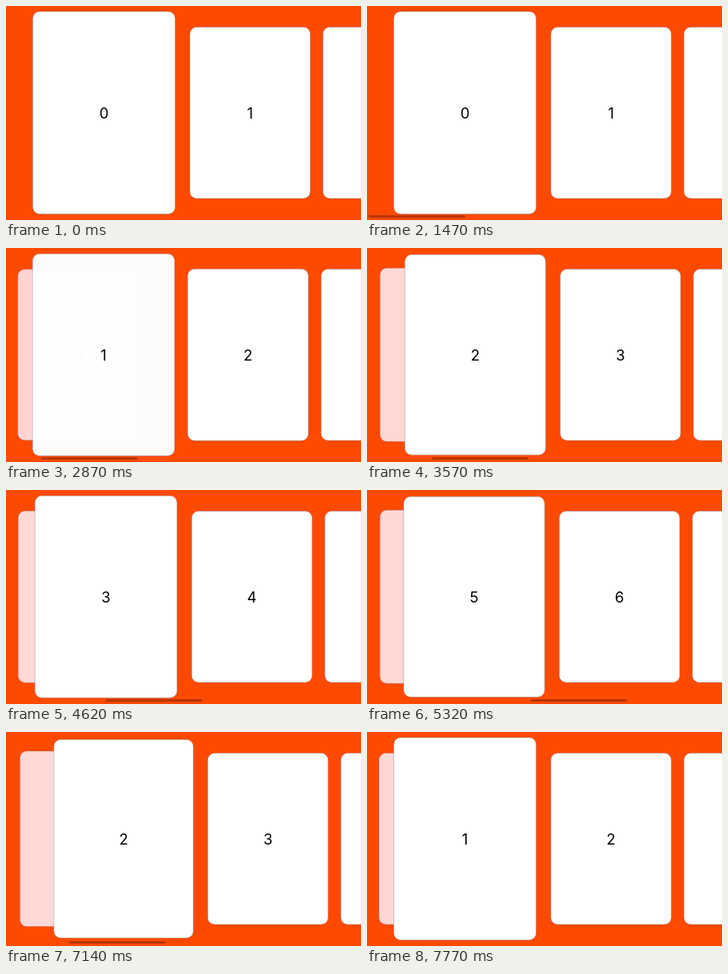
An HTML page for the animation above (8.54 s loop, 444 by 268 pixels).

```html
<!DOCTYPE html>
<html lang="en">
<head>
<meta charset="utf-8">
<title>Card carousel</title>
<style>
  html, body { margin: 0; width: 100%; height: 100%; overflow: hidden; background: #fd4a00; }
  svg { display: block; width: 444px; height: 268px; }
  text { font: 400 18.5px Inter, Roboto, sans-serif; text-anchor: middle; fill: #000; }
  .face { fill: #fff; stroke: #85809a; stroke-opacity: .55; stroke-width: .8; }
  .tint { fill: #fe4a3c; }
</style>
</head>
<body>
<svg id="stage" viewBox="0 0 444 268">
  <rect width="444" height="268" fill="#fd4a00"/>
  <g id="tints"></g>
  <g id="cards"></g>
  <rect id="bar" y="262" width="121" height="3" rx="1.5" fill="#000"/>
</svg>
<script>
const LOOP = 8540, STEP = 70, COUNT = 9, CY = 133.75;
const $ = id => document.getElementById(id);
const clamp = (v, a = 0, b = 1) => Math.min(b, Math.max(a, v));

function add(parent, tag, attrs) {
  const el = document.createElementNS('http://www.w3.org/2000/svg', tag);
  set(el, attrs);
  return parent.appendChild(el);
}
function set(el, attrs) {
  for (const k in attrs) el.setAttribute(k, attrs[k]);
}

const cards = Array.from({ length: COUNT }, (_, i) => {
  const group = add($('cards'), 'g', {});
  const face = add(group, 'rect', { class: 'face', rx: 8.5 });
  const label = add(group, 'text', { y: 140.5 });
  label.textContent = i;
  return { group, face, label, tint: add($('tints'), 'rect', { class: 'tint', rx: 8.5 }) };
});

// Each swipe: the finger drags to a page position, then the list settles on a whole page.
const swipes = [
  { start: 1540, release: 1990, from: 0, drag: 1.33, to: 1, tau: 70, soft: true },
  { start: 2800, release: 3374, from: 1, drag: 1.5, to: 2, tau: 100 },
  { start: 3680, release: 4273, from: 2, drag: 2.55, to: 3, tau: 100 },
  { start: 4640, release: 5044, from: 3, drag: 4, to: 5, tau: 100 },
  { start: 6020, release: 6440, from: 5, drag: 3.384, to: 2, tau: 90 },
  { start: 7080, release: 7210, from: 2, drag: 1.5, to: 1, tau: 75 }
];

function position(t) {
  const s = swipes.filter(w => t >= w.start).pop();
  if (!s) return 0;
  if (t < s.release) {
    const u = (t - s.start) / (s.release - s.start);
    const e = s.soft ? u * u * (3 - 2 * u) : Math.pow(u, 1.7);
    return s.from + (s.drag - s.from) * e;
  }
  const u = (t - s.release) / s.tau;
  const left = Math.exp(-u) * (s.soft ? 1 + u : 1);
  return left < .002 ? s.to : s.to + (s.drag - s.to) * left;
}

function centre(r) {
  if (r < 0) return 122.5 + 32.25 * r;
  return r < 1 ? 122.5 + 182.75 * r : 305.25 + 166.5 * (r - 1);
}

function opacity(r) {
  if (r >= 0) return 1;
  if (r > -1) return 1 - .215 * clamp(-r / .15);
  return clamp(.785 + 1.12 * (r + 1));
}

function barOpacity(t) {
  const shown = (on, off) => t >= on ? clamp((off - t) / 140) : 0;
  return t < 6000 ? shown(1470, 5880) : shown(6020, 7770);
}

function draw(t) {
  const p = position(t);
  cards.forEach((c, i) => {
    const r = i - p, alpha = opacity(r), x = centre(r);
    const shrink = r > 0 ? Math.min(r, 1) : -r;
    const w = Math.max(0, 178 - 27.5 * shrink), h = Math.max(0, 253.5 - 39 * shrink);
    const box = { x: x - w / 2, y: CY - h / 2, width: w, height: h };
    set(c.face, box);
    set(c.tint, { ...box, opacity: r < 0 ? clamp(alpha * 3) : 0 });
    set(c.label, { x });
    set(c.group, { opacity: alpha, display: alpha > 0 && box.x < 450 ? 'inline' : 'none' });
  });
  set($('bar'), { x: 2 + 41 * p, opacity: .28 * barOpacity(t) });
}

const began = performance.now();
function frame() {
  const t = (performance.now() - began) % LOOP;
  draw(Math.floor(t / STEP) * STEP);
  requestAnimationFrame(frame);
}
frame();
</script>
</body>
</html>
```
